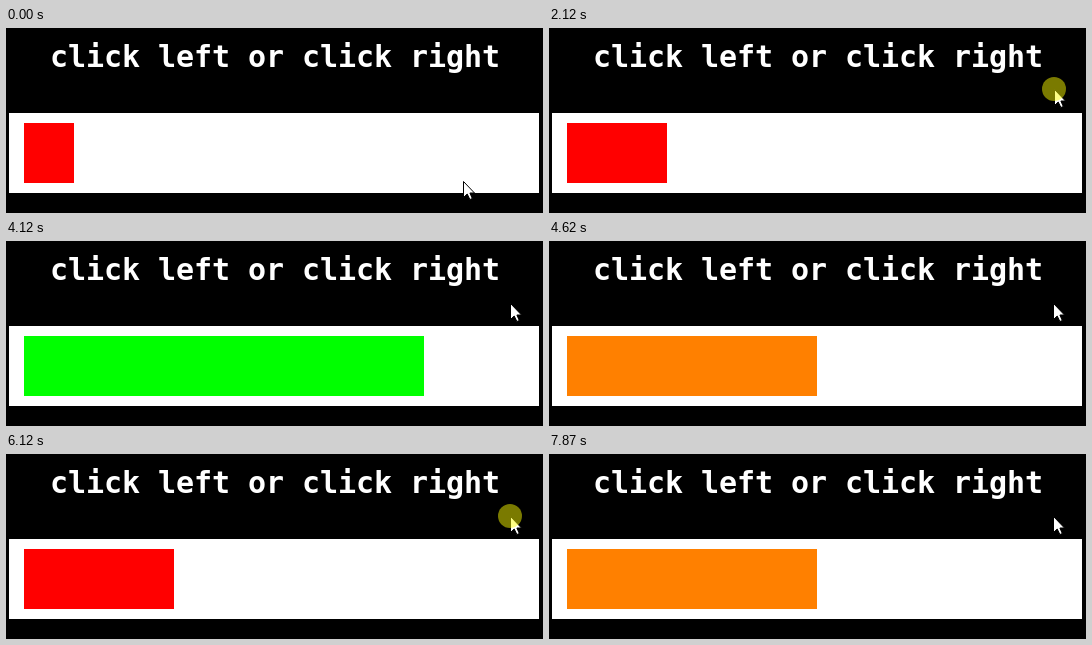
Animation, 537 px wide and 185 px high, one loop 7.99 s. Source, as an HTML page with a canvas:

```html
<!DOCTYPE html>
<html lang="en">
<head>
<meta charset="utf-8">
<title>Click bar</title>
<style>
  html, body { margin: 0; width: 100%; height: 100%; overflow: hidden; background: #000; }
  canvas { display: block; }
</style>
</head>
<body>
<canvas id="stage" width="537" height="185"></canvas>
<script>
const ctx = document.getElementById('stage').getContext('2d');
const LOOP = 7990;
const TICKS = 64;
const UNIT = 50;

// Key points as [tick, value...]
const levelKeys = [
  [0, 1], [9, 1], [10, 0], [15, 1], [23, 5], [24, 6], [28, 8], [31, 9],
  [33, 8], [42, 1], [43, 0], [49, 3], [55, 0], [56, 1], [62, 5]
];
const pointerKeys = [[0, 457, 153], [4, 506, 62], [17, 505, 61], [28, 504, 62]];

// Runs of clicking as [first tick, last tick]
const bursts = [[10, 10], [15, 23], [26, 26], [31, 31], [34, 40], [43, 45], [49, 53], [56, 62]];

const arrow = new Path2D('M.5 .5V16.5L4.2 13L6.9 18.5L9.3 17.5L6.9 12H11.5Z');

// Whole-number steps from one key point to the next
function valuesAt(keys, tick) {
  const next = keys.findIndex(key => key[0] > tick);
  if (next < 0) return keys.at(-1).slice(1);
  const [from, ...a] = keys[next - 1];
  const [to, ...b] = keys[next];
  return a.map((v, i) => v + Math.trunc((b[i] - v) * (tick - from) / (to - from)));
}

// Within a burst the button goes down on every second tick
const isPressed = tick => bursts.some(
  ([first, last]) => tick >= first && tick <= last && (tick - first) % 2 === 0
);

function barColor(level) {
  if (level >= 8) return '#00ff00';
  return level >= 4 ? '#ff8000' : '#ff0000';
}

function rect(x, y, w, h, color) {
  ctx.fillStyle = color;
  ctx.fillRect(x, y, w, h);
}

function drawTitle() {
  ctx.font = 'bold 30px "DejaVu Sans Mono", monospace';
  ctx.letterSpacing = '-0.06px';
  ctx.fillStyle = '#fff';
  ctx.fillText('click left or click right', 44, 39);
}

function drawPointer(x, y, pressed) {
  ctx.save();
  ctx.translate(x, y);
  ctx.fillStyle = '#fff';
  ctx.strokeStyle = '#000';
  ctx.fill(arrow);
  ctx.stroke(arrow);
  if (pressed) {
    ctx.fillStyle = 'rgba(255, 255, 0, 0.48)';
    ctx.beginPath();
    ctx.arc(0, 0, 12, 0, Math.PI * 2);
    ctx.fill();
  }
  ctx.restore();
}

function draw(time) {
  // The small lead absorbs the rounding of tick times to 10 ms
  const tick = Math.floor(time / LOOP * TICKS + 0.1) % TICKS;
  const [level] = valuesAt(levelKeys, tick);
  const [x, y] = valuesAt(pointerKeys, tick);

  rect(0, 0, 537, 185, '#000');
  drawTitle();
  rect(3, 85, 530, 80, '#fff');
  rect(18, 95, level * UNIT, 60, barColor(level));
  drawPointer(x, y, isPressed(tick));
}

const start = performance.now();
function animate() {
  draw((performance.now() - start) % LOOP);
  requestAnimationFrame(animate);
}
animate();
</script>
</body>
</html>
```
